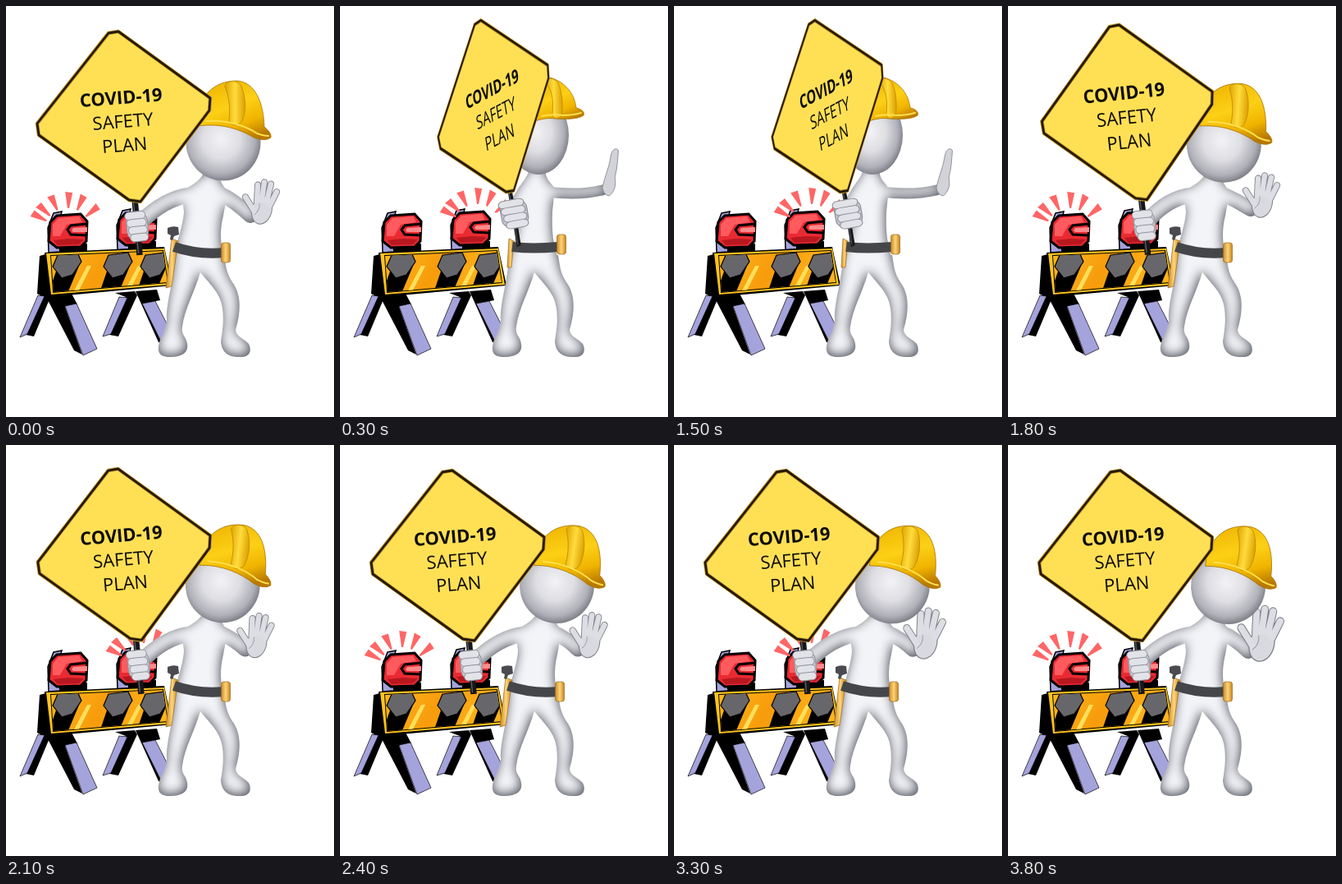
These frames come from a looping animation (400 by 500 pixels, 4000 ms). An HTML page:

```html
<!DOCTYPE html>
<html lang="en">
<head>
<meta charset="utf-8">
<title>Safety plan sign</title>
<style>
html, body { margin: 0; width: 100%; height: 100%; overflow: hidden; background: #fff; }
svg { display: block; width: 400px; height: 500px; }
text { font: 22px "Open Sans", "Noto Sans", sans-serif; text-anchor: middle; fill: #0c0a04; }
.bold { font-weight: 700; }
</style>
</head>
<body>
<svg viewBox="0 0 400 500">
  <defs>
    <filter id="round" filterUnits="userSpaceOnUse" x="130" y="160" width="240" height="290" color-interpolation-filters="sRGB">
      <feGaussianBlur in="SourceAlpha" stdDeviation="7"/>
      <feOffset dx="-1" dy="-2" result="b"/>
      <feFlood flood-color="#464852"/>
      <feComposite in2="b" operator="out"/>
      <feComposite in2="SourceAlpha" operator="in" result="s"/>
      <feMerge><feMergeNode in="SourceGraphic"/><feMergeNode in="s"/></feMerge>
    </filter>
    <radialGradient id="skin" cx=".47" cy=".46" r=".56">
      <stop offset="0" stop-color="#f3f3f6"/><stop offset=".45" stop-color="#dedee3"/>
      <stop offset=".8" stop-color="#b0b1b8"/><stop offset="1" stop-color="#777880"/>
    </radialGradient>
    <linearGradient id="hat" x1=".2" y1="0" x2=".7" y2="1">
      <stop offset="0" stop-color="#eeb402"/><stop offset=".45" stop-color="#fcd016"/>
      <stop offset=".75" stop-color="#f0b400"/><stop offset="1" stop-color="#b87800"/>
    </linearGradient>
    <linearGradient id="ridge">
      <stop offset="0" stop-color="#e0a600"/><stop offset=".5" stop-color="#ffdc3c"/><stop offset="1" stop-color="#dca000"/>
    </linearGradient>
    <linearGradient id="tan">
      <stop offset="0" stop-color="#c98a2a"/><stop offset=".5" stop-color="#ffd478"/><stop offset="1" stop-color="#c48422"/>
    </linearGradient>
    <linearGradient id="board" x1="0" y1="0" x2="1" y2=".2">
      <stop offset="0" stop-color="#ffb81c"/><stop offset=".5" stop-color="#f79c0c"/><stop offset="1" stop-color="#ffb41c"/>
    </linearGradient>
    <clipPath id="face"><path d="M55 304L191 298 197 336 58 348Z"/></clipPath>
    <g id="lamp">
      <path d="M58 252L68 250 62 274 66 299 52 300 51 270Z" fill="#a5a3dc" stroke="#000" stroke-width="1.5"/>
      <path d="M64 291L99 289V299L66 300Z"/>
      <path d="M62 255L91 253 99 262 98 286 91 293 62 294 52 286 54 263Z" fill="#ea2a32" stroke="#000" stroke-width="3"/>
      <path d="M64 258L89 256 93 263 74 266 66 280 57 280V266Z" fill="#ff5a5e"/>
      <path d="M58 285L76 283 95 284 89 290 63 291Z" fill="#b81820"/>
      <path d="M99 265L79 267 75 272 79 278 99 279" fill="none" stroke="#000" stroke-width="3"/>
      <path d="M99 269L82 270 80 273 82 275H99Z" fill="#ff8a8c"/>
    </g>
  </defs>

  <g id="barrier">
    <path d="M41 304L52 301 55 352 34 402 24 400 42 352 38 350ZM48 352L80 350 87 363 72 366 93 424 83 419ZM133 349L157 347 160 352 137 402 126 400 146 354ZM158 347L184 345 188 358 167 362 190 410 186 409Z"/>
    <path d="M39 352L47 353 26 399 17 403ZM72 365L86 362 111 417 94 425ZM138 354L148 355 128 399 118 402ZM166 362L182 359 201 396 190 410Z" fill="#a5a3dc" stroke="#000" stroke-width=".7"/>
    <use href="#lamp"/><use href="#lamp" transform="translate(84 -3)"/>
    <path d="M47 300L193 293 203 340 53 354Z"/>
    <path d="M49 301L193 295 201 339 55 351Z" fill="#ffc51f"/>
    <path d="M54 303L192 297 198 337 57 349Z"/>
    <path d="M55 304L191 298 197 336 58 348Z" fill="url(#board)"/>
    <g id="bars" clip-path="url(#face)"></g>
  </g>
  <path id="rays" fill="#ff6666"/>

  <g filter="url(#round)" fill="#f3f4f8" stroke="#f3f4f8" stroke-width="0">
    <path d="M206 303C205 335 195 360 196 382C195 392 192 398 188 406C183 421 187 427 200 427C214 427 223 422 221 411C220 402 213 400 215 390C218 368 230 348 237 324C250 340 262 350 264 368C266 384 264 395 262 408C263 422 272 427 284 427C298 428 300 419 296 411C290 404 281 403 280 394C286 374 288 352 276 336C268 324 268 314 266 303Z"/>
    <path id="torso"/>
    <path id="armL" fill="none" stroke-linecap="round"/>
    <path id="armR" fill="none" stroke-linecap="round"/>
  </g>
  <path id="holster" fill="url(#tan)" stroke="#9a6a1c" stroke-width=".7"/>
  <path id="hammer" d="M197 270Q203 267 210 269L211 278 205 280 203 285 200 284 201 279 197 277Z" fill="#4a4a50"/>
  <path id="belt" fill="none" stroke="#45464a" stroke-width="12"/>
  <rect id="pouch" x="-5.5" y="-12" width="11" height="24" rx="3" fill="url(#tan)" stroke="#9a6a1c" stroke-width=".7"/>

  <g id="palm" stroke="#7f7f89" fill="none" stroke-linecap="round"></g>
  <path id="edge" d="M-6-5C-2-20 4-30 6-43C8-53 15-54 17-50C16-40 16-30 12-18C14-8 12-1 4 5Q-4 4-6-5Z" fill="#d2d3d9" stroke="#8a8a93"/>

  <g id="head">
    <ellipse id="skull" fill="url(#skin)"/>
    <path id="dome" fill="url(#hat)" stroke="#a87400" stroke-width=".8"/>
    <path id="crest" fill="url(#ridge)" stroke="#c08a00" stroke-width=".8"/>
    <path id="brim" fill="none" stroke="#ffdf4c" stroke-width="2" stroke-linecap="round"/>
  </g>

  <g id="sign">
    <path d="M14 100L20 168" stroke="#17171a" stroke-width="7.5"/>
    <path d="M12.5 104L18.5 166" stroke="#5c5c62" stroke-width="1.4"/>
    <path d="M-18-102L-6-104 106-23 105-8 21 103 7 101-103 22-105 8Z" fill="#ffe055" stroke="#c79a2b" stroke-width="4.5" stroke-linejoin="round"/>
    <path d="M-18-102L-6-104 106-23 105-8 21 103 7 101-103 22-105 8Z" fill="none" stroke="#251a05" stroke-width="2.8" stroke-linejoin="round"/>
    <g id="label">
      <text class="bold" x="-1" y="-16">COVID-19</text>
      <text x="-1" y="13">SAFETY</text>
      <text x="-1" y="42">PLAN</text>
    </g>
  </g>
  <g id="fist" fill="#e2e3e8" stroke="#8f8f98" stroke-width=".9"></g>
</svg>
<script>
const el = Object.fromEntries([...document.querySelectorAll("[id]")].map(e => [e.id, e]));
const set = (e, attrs) => { for (const a in attrs) e.setAttribute(a, attrs[a]); };
const lerp = (a, b, k) => a + (b - a) * k;

// Front and turned outlines share one structure, so their numbers blend.
const NUM = /-?\d+(\.\d+)?/g;
function blend([a, b], k) {
  const to = b.match(NUM);
  let i = 0;
  return a.replace(NUM, n => lerp(+n, +to[i++], k).toFixed(2));
}
const shapes = {
  torso: ["M240 205C234 216 222 219 214 227L217 250C216 270 207 285 205 312L238 324L266 310C262 290 260 275 265 255L270 228C266 218 260 214 260 205Z",
          "M231 198C228 210 222 214 216 224L221 250C220 270 210 288 207 312L238 324L266 308C260 290 258 275 259 250L262 222C257 214 251 212 250 198Z"],
  holster: ["M202 283L210 286L202 341L195 343Z", "M206 283L212 286L209 318L204 318Z"],
  belt: ["M205 293Q234 303 266 300", "M210 293Q235 296 266 293"],
  dome: ["M234 134C238 104 258 91 282 91C304 93 314 117 315 147C320 151 324 156 323 160C316 165 308 162 302 160C286 150 262 142 234 146Z",
         "M238 118C244 98 248 88 256 87C274 92 286 106 288 124C294 125 299 129 297 133C290 138 274 138 262 137C254 136 246 137 238 140Z"],
  crest: ["M267 98C267 90 284 89 287 98C293 112 293 128 288 140C283 147 274 146 272 139C274 122 271 108 267 98Z",
          "M250 92C256 86 262 88 266 94C272 106 272 126 270 134C266 138 260 137 259 132C261 114 258 100 250 92Z"],
  brim: ["M244 140C272 138 294 147 306 155Q314 158 320 158", "M246 134C256 131 264 132 272 133Q284 133 294 130"]
};

// step, turn, settle, head tilt, head x, head y, hand x, hand y, hand size
const keys = [
  [0, 0, 0, 0, 0, 0, 0, 0, 1],
  [1, .35, 0, 0, 0, 0, 0, 0, 1],
  [3, 1, 0, 0, 0, 0, 0, 0, 1],
  [7, 1, 0, 0, 0, 0, -7, 0, 1],
  [14, 1, 0, 0, 0, 0, -7, 0, 1],
  [15, 1, 0, 0, 0, 0, 0, 0, 1],
  [18, 0, 1, 4, -4, 1, -2, -8, 1],
  [22, 0, 0, 8, -5, 2, -8, -6, 1],
  [29, 0, 0, 8, -5, 2, -8, -8, 1.06],
  [38, 0, 0, 8, -1, 3, -5, -4, 1.25]
];
function pose(n) {
  const i = Math.max(1, keys.findIndex(r => r[0] >= n));
  const a = keys[i - 1], b = keys[i], k = (n - a[0]) / (b[0] - a[0]);
  return a.map((v, j) => lerp(v, b[j], k));
}

function rayPath(cx, cy) {
  return [-152, -137, -115, -88, -66, -40].map(deg => {
    const a = deg * Math.PI / 180;
    const at = (r, s) => [cx + r * Math.cos(a) - s * Math.sin(a), cy + r * Math.sin(a) + s * Math.cos(a)].map(v => v.toFixed(1));
    return `M${at(29, 1)}L${at(48, 4.5)}L${at(49, -4.5)}L${at(29, -1)}Z`;
  }).join("");
}
const rays = [rayPath(75, 275), rayPath(167, 270)];

el.bars.innerHTML = [56, 118, 163].map(x =>
  `<path d="M${x - 5} 352L${x + 8} 314H${x + 34}L${x + 18} 352Z"/>
   <path d="M${x + 7} 303L${x + 31} 300 ${x + 36} 311 ${x + 25} 327 ${x + 12} 331 ${x + 1} 317Z" fill="#67676b" stroke="#000" stroke-width="1.2"/>
   <path d="M${x + 25} 350L${x + 43} 316 ${x + 48} 316 ${x + 31} 350Z" fill="#ffdf5c"/>`).join("");

// Outline first, then the lighter inside of each finger.
const fingers = "M4-18L5-37M10-20L13-40M16-18L21-38M20-14L28-29M2-5L-10-23";
el.palm.innerHTML = `<path d="${fingers}" stroke-width="8"/>
  <ellipse cx="10" cy="-8" rx="12" ry="16" transform="rotate(18 10 -8)" fill="#d9dae0" stroke-width="1"/>
  <path d="${fingers}" stroke="#dddee4" stroke-width="6.3"/>
  <path d="M1-3Q8-8 7-16" stroke="#a5a5ae"/>`;
el.fist.innerHTML = `<rect x="-13" y="-17" width="26" height="36" rx="12" fill="#c4c5cd"/>` +
  [-17, -8, 1, 10].map((y, i) => `<rect x="${-14 + i * 1.4}" y="${y}" width="${25 - i}" height="9.5" rx="4.7"/>`).join("");

function draw(n) {
  const [, k, s, tilt, hx, hy, dx, dy, size] = pose(n);
  const mid = (a, b) => lerp(a, b, k);
  for (const id in shapes) el[id].setAttribute("d", blend(shapes[id], k));
  set(el.rays, { d: rays[n % 2] });

  // The turned sign sinks a little as the hand draws in.
  const sink = -k * dx / 4;
  const m = [mid(1, .649) - .01 * s, mid(0, -.262) - .02 * s, mid(0, .109) + .035 * s, mid(1, 1.035) + .03 * s,
             mid(143, 187) + 2 * s + sink, mid(135, 123.5) - 5 * s + sink];
  set(el.sign, { transform: `matrix(${m})` });
  set(el.label, { transform: `translate(${4 * k} ${2 * k}) rotate(-4.5)` });

  const fx = m[0] * 17 + m[2] * 132 + m[4], fy = m[1] * 17 + m[3] * 132 + m[5] - 4 * k;
  set(el.fist, { transform: `translate(${fx} ${fy}) rotate(${mid(-6, -10)}) scale(${mid(1, 1.25)} ${mid(1, .95)})` });
  set(el.armL, { d: `M${mid(226, 228)} ${mid(230, 226)}Q${mid(194, 218)} ${mid(233, 236)} ${fx + 3} ${fy - 3}`, "stroke-width": mid(19, 20) });

  const wx = mid(302, 324) + dx + 9 * Math.sin(Math.PI * k), wy = mid(257, 226) + dy;
  set(el.armR, { d: `M${mid(260, 252)} ${mid(228, 226)}Q${mid(278, 290)} ${mid(236, 231)} ${wx - 4} ${wy - 2}`, "stroke-width": mid(18, 13) });
  const side = k > .5;
  set(el.palm, { transform: `translate(${wx} ${wy}) scale(${size * mid(1, .7)} ${size * 1.06})`, visibility: side ? "hidden" : "visible" });
  set(el.edge, { transform: `translate(${wx + 1} ${wy}) scale(.85 1)`, visibility: side ? "visible" : "hidden" });

  set(el.skull, { cx: mid(265, 242), cy: mid(166, 157), rx: mid(45.5, 37), ry: mid(46.5, 48) });
  set(el.head, { transform: `translate(${hx} ${hy}) rotate(${tilt} 250 200)` });
  set(el.pouch, { transform: `translate(${mid(268, 270)} ${mid(300, 290)})` });
  set(el.hammer, { visibility: side ? "hidden" : "visible" });
}

const start = performance.now();
let last = -1;
function tick() {
  const t = Math.max(0, performance.now() - start) % 4000;
  const n = Math.min(38, Math.floor(t / 100));
  if (n !== last) draw(last = n);
  requestAnimationFrame(tick);
}
tick();
</script>
</body>
</html>
```
